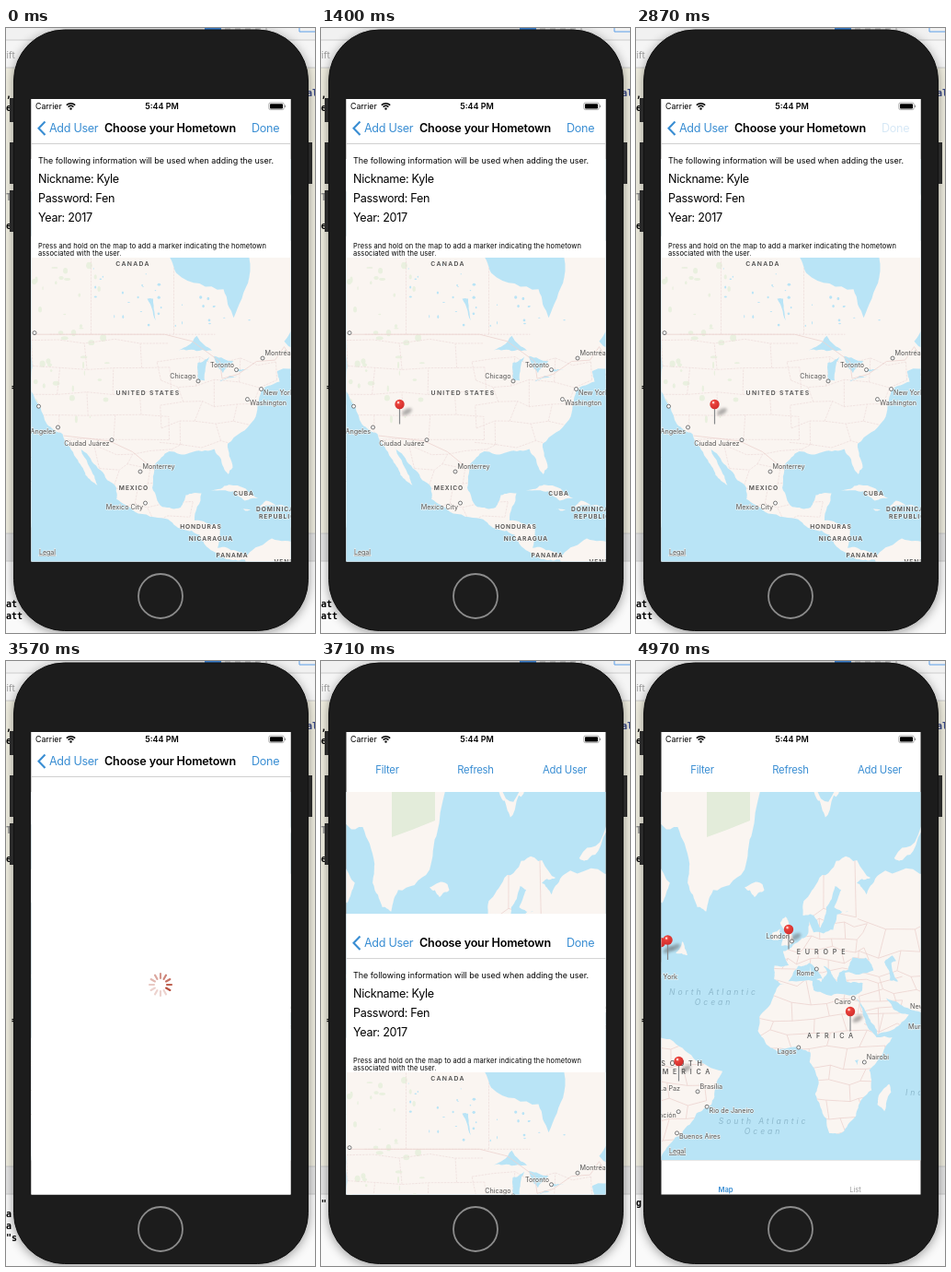
Recreate the animation shown at these times as an HTML page. Size 336 by 656 pixels, loop 5040 ms.

```html
<!DOCTYPE html>
<html lang="en">
<head>
<meta charset="utf-8">
<title>Choose your Hometown</title>
<style>
html, body { margin: 0; width: 100%; height: 100%; overflow: hidden; background: #f3f3f3; }
svg { display: block; }
text { font-family: Inter, Roboto, sans-serif; white-space: pre; }
.ui { font-size: 12.6px; letter-spacing: -.025em; }
.title { font-weight: 600; letter-spacing: -.014em; text-anchor: middle; }
.bar { font-size: 11.3px; letter-spacing: -.02em; text-anchor: middle; }
.blue { fill: #3a8ed3; }
.bold { font-weight: 600; }
.m { text-anchor: middle; }
.e { text-anchor: end; }
.note { font-size: 7.5px; letter-spacing: .1px; }
.tab { font-size: 7.6px; text-anchor: middle; }
.code text { font: bold 10px "DejaVu Sans Mono", "Liberation Mono", monospace; }
.water { fill: #b9e4f6; }
.land { fill: #faf5f1; }
.line { fill: none; stroke: #ecd3d0; stroke-width: .8; stroke-linejoin: round; }
.state { fill: none; stroke: #ecdcda; stroke-width: .7; stroke-dasharray: 2.5 1; }
.tags text { font-size: 7.2px; fill: #565656; stroke: #faf5f1; stroke-width: 1.4px; stroke-opacity: .7; paint-order: stroke; }
.tags .c { font-size: 6.8px; font-weight: 600; letter-spacing: 1.3px; fill: #4e4e4e; }
.tags .k { font-size: 6.7px; font-weight: 600; letter-spacing: .9px; fill: #4e4e4e; }
.tags .w { font-weight: 500; letter-spacing: 4.8px; fill: #4e4e4e; }
.tags .o { font-size: 8.6px; font-style: italic; letter-spacing: 2.9px; fill: #8db9cd; stroke: none; }
.tags .legal { font-size: 7px; text-decoration: underline; }
.town { fill: #fff; stroke: #666; stroke-width: .9; }
</style>
</head>
<body>
<svg width="336" height="656" viewBox="0 0 336 656">
  <defs>
    <clipPath id="screen"><rect x="27.5" y="77" width="282" height="501.5"/></clipPath>
    <clipPath id="homeClip"><rect x="27" y="249" width="283" height="330"/></clipPath>
    <clipPath id="worldClip"><rect x="27" y="142" width="283" height="399"/></clipPath>
    <filter id="soft" x="-1" y="-1" width="3" height="3"><feGaussianBlur stdDeviation="1.6"/></filter>
    <filter id="shade" x="-.1" y="-.1" width="1.2" height="1.2"><feGaussianBlur stdDeviation="6"/></filter>
    <radialGradient id="red" cx=".38" cy=".32" r=".75">
      <stop offset="0" stop-color="#ff8d80"/><stop offset=".3" stop-color="#e8403a"/><stop offset="1" stop-color="#cf2c2b"/>
    </radialGradient>
    <g id="pin">
      <ellipse cx="8" cy="8" rx="6" ry="3" transform="rotate(-30 8 8)" fill="#555" opacity=".45" filter="url(#soft)"/>
      <path d="M0 4V21.5" stroke="#85888a" stroke-width="1.2"/>
      <circle r="5.2" fill="url(#red)"/>
      <circle cx="-1.5" cy="-1.8" r="1.1" fill="#fff" opacity=".75"/>
    </g>
  </defs>

  <!-- desktop behind the phone -->
  <rect width="336" height="656" fill="#f1f1f1"/>
  <rect y="13" width="336" height="30" fill="#f5f5f5"/>
  <rect y="43" width="336" height="505" fill="#f0eee0"/>
  <rect y="548" width="336" height="30" fill="#e4e4e4"/>
  <rect y="578" width="336" height="78" fill="#fafafa"/>
  <path d="M0 13H336M0 43H336M0 548H336M0 578H336" stroke="#ccc"/>
  <rect x="216" width="18" height="3" fill="#3f8ae0"/>
  <path d="M238 1H284" stroke="#aaa" stroke-dasharray="6 5"/>
  <path d="M319 0V4H336" fill="none" stroke="#5a9ee8"/>
  <text x="-5" y="33" font-size="10" fill="#999">vift</text>
  <g class="code">
    <text x="0" y="76">,</text><text x="0" y="90">e</text>
    <text x="0" y="187" fill="#888">T</text><text x="0" y="218">e</text>
    <text x="6" y="393">=</text><text x="327" y="74" fill="#3a4a8a">al</text>
  </g>
  <rect x="8" y="4" width="321" height="652" rx="56" opacity=".4" filter="url(#shade)"/>
  <g class="code">
    <g id="log0"><text x="0" y="628">at</text><text x="0" y="641">att</text></g>
    <g id="log1"><text x="0" y="603">a</text><text x="0" y="616">a</text><text x="0" y="629">"s</text></g>
    <text id="log2" x="0" y="592">"</text>
    <text id="log3" x="0" y="591">g</text>
  </g>

  <!-- phone -->
  <path d="M4 76h5v26h-5zM4 124h5v45h-5zM4 176h5v45h-5zM328 124h5v45h-5z" fill="#2a2a2a"/>
  <rect x="8.5" y="2" width="320" height="651.5" rx="55" fill="#1c1c1c" stroke="#111"/>
  <circle cx="168" cy="616" r="24" fill="none" stroke="#8c8c8c" stroke-width="1.8"/>

  <g clip-path="url(#screen)">
    <rect x="27" y="77" width="283" height="502" fill="#fff"/>
    <g class="bar blue">
      <text x="72" y="122">Filter</text><text x="168" y="122">Refresh</text><text x="265" y="122">Add User</text>
    </g>
    <g clip-path="url(#worldClip)">
      <g id="world"></g>
      <use href="#pin" x="166" y="291"/><use href="#pin" x="233" y="380"/><use href="#pin" x="46.5" y="434"/>
      <g id="added"><use href="#pin" x="27" y="305"/><use href="#pin" x="34.5" y="302.5"/></g>
    </g>
    <path d="M27 541.5H310" stroke="#d5d5d5" stroke-width=".6"/>
    <text class="tab blue bold" x="97.5" y="576">Map</text>
    <text class="tab" x="238.5" y="576" fill="#999">List</text>

    <g id="sheet">
      <rect x="27" y="77" width="283" height="502" fill="#fff"/>
      <g id="form">
        <text x="35" y="146.5" font-size="8.95">The following information will be used when adding the user.</text>
        <g class="ui">
          <text x="35" y="168">Nickname: Kyle</text>
          <text x="35" y="189">Password: Fen</text>
          <text x="35" y="210">Year: 2017</text>
        </g>
        <g class="note">
          <text x="35" y="239">Press and hold on the map to add a marker indicating the hometown</text>
          <text x="35" y="247">associated with the user.</text>
        </g>
        <g clip-path="url(#homeClip)">
          <g id="home"></g>
          <use id="marker" href="#pin" x="85.5" y="408"/>
        </g>
      </g>
      <g id="spinner" stroke="#b8503f" stroke-width="2.1" stroke-linecap="round"></g>
      <path d="M27 125.5H310" stroke="#c4c4c4" stroke-width=".8"/>
      <path d="M42.5 101.5L35.5 108.7L42.5 116" fill="none" stroke="#3a8ed3" stroke-width="2.1"/>
      <g class="ui">
        <text class="blue" x="47" y="113">Add User</text>
        <text class="title" x="178.5" y="113">Choose your Hometown</text>
        <text class="blue" id="done" x="267" y="113">Done</text>
      </g>
    </g>

    <text x="32" y="88" font-size="8.8">Carrier</text>
    <g fill="none" stroke="#000" stroke-width="1.5">
      <path d="M65.8 83.6a7 7 0 0 1 9.4 0M67.6 85.6a4.4 4.4 0 0 1 5.8 0"/><circle cx="70.5" cy="87.6" r=".5"/>
    </g>
    <text class="bold m" x="169.5" y="88" font-size="9">5:44 PM</text>
    <rect x="285.8" y="81" width="16.4" height="7.6" rx="1.8" fill="none" stroke="#888" stroke-width=".7"/>
    <rect x="287" y="82.2" width="14" height="5.2" rx=".9"/>
    <path d="M303.6 83.6v2.4" stroke="#888"/>
  </g>
</svg>

<script>
const $ = id => document.getElementById(id);
const RAD = Math.PI / 180;
let seed = 7;
const rnd = (a, b) => a + (b - a) * ((seed = seed * 16807 % 2147483647) / 2147483647);

// Mercator views: pixel of 0°,0° and pixels per degree
const near = { x: 647.5, y: 614, s: 5 };
const far = { x: 169.5, y: 432.9, s: 2.14 };
const place = (v, [lon, lat]) => [
  v.x + v.s * lon,
  v.y - v.s / RAD * Math.log(Math.tan((45 + lat / 2) * RAD))
].map(n => +n.toFixed(1));

const points = str => {
  const n = str.trim().split(/\s+/).map(Number);
  return n.flatMap((x, i) => i % 2 ? [] : [[x, n[i + 1]]]);
};
const path = (v, pts) => 'M' + pts.map(p => place(v, p)).join('L');

// midpoint displacement turns a few key points into a coast
const rough = (pts, level = 3) => level ? rough(pts.flatMap((p, i) => {
  const q = pts[(i + 1) % pts.length], k = rnd(-.1, .1);
  return [p, [(p[0] + q[0]) / 2 + (q[1] - p[1]) * k, (p[1] + q[1]) / 2 - (q[0] - p[0]) * k]];
}), level - 1) : pts;
const coast = (v, str) => str.split('|').map(s => path(v, rough(points(s))) + 'Z').join('');
const fill = (cls, d) => `<path class="${cls}" d="${d}"/>`;
const line = (v, str) => fill('line', str.split('|').map(s => path(v, points(s))).join(''));

// jittered brick pattern of borders over a box of degrees
function net(v, cls, [x0, x1], [y0, y1], dx, dy, wobble) {
  const cols = Math.round((x1 - x0) / dx), rows = Math.round((y1 - y0) / dy);
  const node = Array.from({ length: rows + 1 }, (_, j) => Array.from({ length: cols + 1 }, (_, i) =>
    [x0 + (i + rnd(-wobble, wobble)) * dx, y0 + (j + rnd(-wobble, wobble)) * dy]));
  let d = '';
  node.forEach((row, j) => {
    d += path(v, row);
    if (j < rows) row.forEach((p, i) => { if ((i + j) % 2) d += path(v, [p, node[j + 1][i]]); });
  });
  return fill(cls, d);
}
const blobs = (n, color, [x0, x1], [y0, y1], r) => Array.from({ length: n }, () =>
  `<ellipse cx="${rnd(x0, x1)}" cy="${rnd(y0, y1)}" rx="${rnd(.5, r)}" ry="${rnd(.5, r)}" fill="${color}"/>`).join('');

const america = `-130 66 -130 54 -124 48 -124.2 40.4 -120.6 34.6 -117.2 32.8 -114.2 28.3 -112.2 25 -109.6 23 -111.3 26.5
 -114.7 31.7 -112.5 29.5 -109 26 -105.5 22.5 -105.5 20.2 -101.5 17.6 -94.8 16.2 -91 13.9 -87.4 12.8 -85.5 10 -83 8.3
 -80.3 7.4 -77.5 7.5 -77 5 -66 5 -66 10.6 -71.7 12 -77 8.4 -79.5 9.4 -83.5 10 -83.3 15 -88.5 15.8 -87 21.4 -90.4 21
 -91.5 18.5 -95.5 18.6 -97.7 22.5 -97.2 27 -94 29.6 -89.6 29.3 -84.2 30 -82.7 28 -81.2 25.2 -80.2 26.5 -81.3 31
 -75.6 35.3 -74 40.5 -70 41.8 -70.5 43.5 -60.3 46 -69 48 -66.5 50.2 -58 51 -64.5 60.3 -67 58.4 -77.5 62.4 -76.6 56.5
 -80 51.3 -82.2 55 -92.5 57 -94.5 60 -100 66`;
const caribbean = `-84.9 21.9 -81 23.1 -74.3 20.2 -77.6 19.9 -80 21.8|-74.4 18.5 -73 19.9 -68.5 18.6|-78.3 18.3 -76.3 18 -77.4 17.8`;
const lakes = `-92 46.7 -88 48.8 -84.7 46.6 -87.5 46.6|-87.7 42 -86.3 42 -85.3 45.7 -87.8 44.8|-84.3 45.8 -80 45 -82.3 43.2 -83.4 44
 |-83.3 41.7 -79 42.8 -81 42.7|-79.7 43.3 -76.4 43.8 -79 43.8|-98.8 53.8 -97.5 53.8 -96.6 50.5`;
const frontier = `-123 49 -95 49 -89 48 -83 45 -82.5 42.3 -79 43 -75 45 -71 45.2 -69 47.2 -67 45
 |-117 32.5 -107 31.5 -102 29.5 -97.2 26`;

const greenland = '-73 78 -58 75.5 -52 70 -53 66.5 -48 61 -43.5 60 -40 65 -24 69 -20 75 -12 81.5 -60 82.5';
const eurasia = `-5.6 36 -9 38 -8.8 43.2 -1.5 43.4 -4.5 48.3 4 51.8 8.3 54 9 57.4 11 54.2 21 55 23 59.2 29 60 21.5 61 25 65
 22 65.8 17.5 61 14.5 55.5 11 59 5.5 59 6 62.5 14 67.5 25.5 71 40 67.5 33 66.5 38 64 44 68 72 69 72 22 57 26 48 30
 51.5 25 59.5 22.5 52 15.6 43.5 12.8 39 21 34.8 28`;
const africa = ` 32.6 30 37.3 20 43 11.5 51 11.5 46 3 39.3 -5 40.5 -15 35 -20 32.6 -27 26.5 -33.8 19 -34.6 14.5 -23 11.8 -17
 13.5 -10 9 -1 9.3 4 4 6.2 -7.5 4.5 -13.5 9 -17.3 14.7 -16.5 21.5 -9.8 29.7 -6 35.8 10.5 37.2 11 33.5 20 31 32.5 31.3`;
const northMed = ` 35.5 33 36 36.5 28 36.8 27 40.5 41.5 41.4 37.5 46 31 46.3 28.5 41.5 24 40.5 23 36.8 19.5 41.5 13 45.5 18 40.5
 15.8 38 12 42 8.8 44.2 3.2 43 -.5 38.5 -2 36.8`;
const brazil = '-75 10 -62 10.6 -50 1 -35.3 -5.5 -39 -14 -41 -22 -48.5 -26 -56 -35 -62 -39 -67 -46 -75 -46';
const isles = `-75 73 -62 66.5 -66 62 -75 64|-59 47.7 -55.6 51.5 -53 47|-24 65.5 -15 66.2 -14 65 -19 63.4|11 79.5 26 80 17 76.7
 |52 71 68 76.8 57 71|-10 52 -6 52.2 -6 55.2 -10 54|-5.5 50.1 1.4 51.2 0 53.5 -2 57.6 -3.2 58.6 -6 57 -3 54 -4.8 51.8
 |49.3 -12 50.4 -16 47 -25 43.5 -22 44.5 -17|12.5 38 15.5 38.2 15 36.8|8.5 39 9.6 39.2 9.3 43`;
const caspian = '47 44.5 51 46.8 53 45 50.5 44 54 37 50 37.3 49.5 41|32 0 34 .3 33 -2.4';

// towns by longitude and latitude; the name sits at one corner of the dot
const town = v => ([name, lon, lat, corner]) => {
  const [x, y] = place(v, [lon, lat]), right = corner[1] === 'e';
  return `<circle class="town" cx="${x}" cy="${y}" r="2"/>` +
    tag([x + (right ? 2.5 : -2.5), y + (corner[0] === 'n' ? -3 : 6.5), name, right ? '' : 'e']);
};
const tag = ([x, y, str, cls]) => `<text x="${x}" y="${y}" class="${cls}">${str}</text>`;
const labels = (v, towns, tags) => `<g class="tags">${towns.map(town(v)).join('')}${tags.map(tag).join('')}</g>`;
const within = (id, d, body) => `<clipPath id="${id}"><path d="${d}"/></clipPath><g clip-path="url(#${id})">${body}</g>`;
const sea = '<rect class="water" x="27" y="142" width="283" height="437"/>';

const continent = coast(near, america);
$('home').innerHTML = sea + fill('land', continent + coast(near, caribbean)) +
  within('continent', continent,
    blobs(40, '#e9f0df', [30, 110], [255, 430], 4) + blobs(45, '#b9e4f6', [95, 270], [252, 325], 1.8) +
    net(near, 'state', [-124, -96], [32, 49], 6, 4, .08) + net(near, 'state', [-96, -70], [31, 46], 4.2, 3.5, .22) +
    net(near, 'state', [-120, -84], [49, 61], 9, 12, 0) + net(near, 'state', [-110, -92], [16, 30], 4, 3.5, .3)) +
  fill('water', coast(near, lakes)) + line(near, frontier) +
  labels(near, [
    ['', -123.3, 49.2, 'ne'], ['', -122.4, 37.7, 'ne'], ['Los Angeles', -118.2, 34, 'sw'], ['Ciudad Juárez', -106.5, 31.7, 'sw'],
    ['Monterrey', -100.3, 25.7, 'ne'], ['Mexico City', -99.2, 19.4, 'sw'], ['Chicago', -87.7, 41.9, 'nw'], ['Toronto', -79.4, 43.7, 'nw'],
    ['Montréal', -73.7, 45.5, 'ne'], ['New York', -74, 40.6, 'se'], ['Washington', -77, 38.9, 'se']
  ], [
    [138, 258, 'CANADA', 'c m'], [154.5, 398, 'UNITED STATES', 'c m'], [139, 501, 'MEXICO', 'k m'], [258.5, 507, 'CUBA', 'k m'],
    [272, 524, 'DOMINICAN', 'k'], [275, 531.5, 'REPUBLIC', 'k'], [212, 543, 'HONDURAS', 'k m'], [223, 555.5, 'NICARAGUA', 'k m'],
    [246, 573.5, 'PANAMA', 'k m'], [291.5, 580.5, 'VENEZUELA', 'k'], [36, 570.5, 'Legal', 'legal']
  ]);

const lands = [eurasia + africa + northMed, greenland, brazil, isles].map(s => coast(far, s));
$('world').innerHTML = sea + lands.map(d => fill('land', d)).join('') +
  '<path d="M77 142H124V173L99 183L77 191Z" fill="#e3ecda"/>' +
  within('oldWorld', lands[0],
    net(far, 'line', [-18, 52], [-35, 35], 9, 8, .3) + net(far, 'line', [-10, 40], [41, 57], 6, 4, .35) +
    net(far, 'line', [8, 32], [59, 72], 8, 13, .15) + net(far, 'line', [36, 72], [16, 56], 9, 8, .3)) +
  within('newWorld', lands[2], net(far, 'line', [-72, -48], [-38, 6], 9, 9, .3)) +
  fill('water', coast(far, caspian)) +
  labels(far, [
    ['London', 0, 51.5, 'nw'], ['Rome', 12.5, 41.9, 'sw'], ['Cairo', 31.2, 30, 'sw'], ['Lagos', 3.4, 6.5, 'sw'], ['Nairobi', 36.8, -1, 'ne'],
    ['Brasília', -47.9, -15.7, 'ne'], ['Rio de Janeiro', -43.2, -22.9, 'se'], ['Buenos Aires', -58.4, -34.6, 'se'], ['Asunción', -57.6, -25.2, 'sw']
  ], [
    [203.5, 318, 'EUROPE', 'w m'], [213.5, 409, 'AFRICA', 'w m'], [52, 438.5, 'SOUTH', 'w m'], [52, 447.5, 'AMERICA', 'w m'],
    [84.5, 362, 'North Atlantic', 'o m'], [84.5, 373, 'Ocean', 'o m'], [138.5, 502, 'South Atlantic', 'o m'],
    [138.5, 513, 'Ocean', 'o m'], [293, 471, 'Indian', 'o'], [48, 466, 'La Paz', 'e'], [45, 345, 'New York', 'e'],
    [298, 377, 'New Delhi', ''], [296, 399, 'Mumbai', ''], [36, 534, 'Legal', 'legal']
  ]);

const spokes = 12;
$('spinner').innerHTML = Array.from({ length: spokes }, (_, i) =>
  `<path d="M168 344V339" transform="rotate(${i * 360 / spokes} 168 351)"/>`).join('');

const LOOP = 5040, TICK = 70;
const show = (id, on) => $(id).setAttribute('visibility', on ? 'inherit' : 'hidden');
// critically damped spring
const spring = ms => { const k = Math.max(0, ms) * .0181; return 1 - (1 + k) * Math.exp(-k); };

function draw(t) {
  const busy = t >= 2940 && t < 3640;
  show('marker', t >= 1190 && !busy);
  show('form', !busy);
  show('spinner', busy);
  $('done').setAttribute('opacity', t >= 2800 && t < 2940 ? .2 : 1);
  const head = Math.floor((t - 2195) * spokes / 1000);
  [...$('spinner').children].forEach((el, i) => {
    const age = ((head - i) % spokes + spokes) % spokes;
    el.setAttribute('opacity', Math.max(.25, 1 - age * .1));
  });
  $('sheet').setAttribute('transform', `translate(0 ${(501 * spring(t - 3635)).toFixed(2)})`);
  show('sheet', t < 4300);
  show('added', t >= 4340);
  show('log0', t < 3360);
  show('log1', t >= 3360 && t < 3640);
  show('log2', t >= 3640 && t < 4340);
  show('log3', t >= 4340);
}
function loop() {
  draw(Math.floor(performance.now() % LOOP / TICK) * TICK);
  requestAnimationFrame(loop);
}
loop();
</script>
</body>
</html>
```
